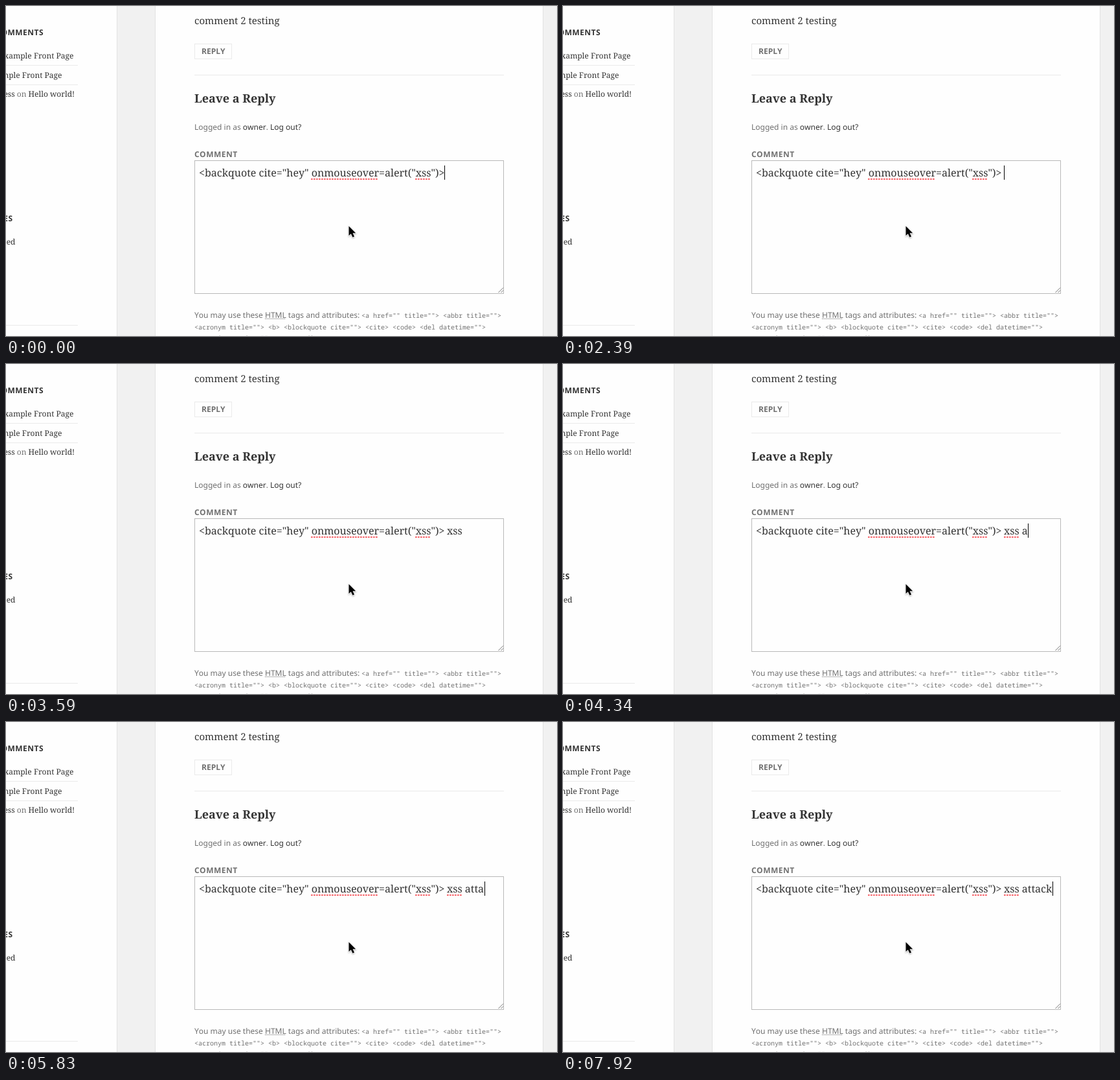
Animation of 851x509 px, one loop 8000 ms. Source, as an HTML page:

```html
<!DOCTYPE html>
<html lang="en">
<head>
<meta charset="utf-8">
<title>Comment form</title>
<style>
  html, body { margin: 0; width: 100%; height: 100%; overflow: hidden; background: #f1f1f1; }
  svg { display: block; width: 851px; height: 509px; }
  text {
    font: 12px "Noto Sans", sans-serif; fill: #707070; white-space: pre;
    font-kerning: none; font-variant-ligatures: none; text-rendering: geometricPrecision;
  }
  .serif { font-family: "Noto Serif", serif; fill: #333; }
  .body { font-size: 15px; }
  .field { font-size: 16px; }
  .title { font-size: 18px; font-weight: 700; }
  .label { font-weight: 700; }
  .wide { letter-spacing: .04em; }
  .code { font: 10px "Noto Sans Mono", monospace; }
  .end { text-anchor: end; }
  .dark { fill: #333; }
  .grey { fill: #707070; }
  .panel { fill: #fefefe; stroke: #e2e2e2; }
  .rule { stroke: #eaeaea; fill: none; }
  .spell { stroke: #f7646a; stroke-width: 2; stroke-dasharray: 2.7 1.3; }
</style>
</head>
<body>
<svg viewBox="0 0 851 509">
  <rect class="panel" x="-10.5" y="-10.5" width="182" height="530"/>
  <rect class="panel" x="230.5" y="-10.5" width="599" height="530"/>

  <!-- Sidebar -->
  <text class="label wide dark end" x="58" y="45">COMMENTS</text>
  <text class="serif end" x="104.5" y="81">xample Front Page</text>
  <text class="serif end" x="86.5" y="111">Example Front Page</text>
  <text class="serif end" x="106" y="140">ess <tspan class="grey">on</tspan> Hello world!</text>
  <text class="label wide dark end" x="10.5" y="332">CATEGORIES</text>
  <text class="serif end" x="14.5" y="368">Uncategorized</text>
  <path class="rule" d="M0 91.5H111M0 121.5H111M0 492.5H111"/>

  <!-- Comment thread -->
  <text class="serif body" x="291" y="28">comment 2 testing</text>
  <rect class="rule" x="291.5" y="58.5" width="57" height="23"/>
  <text class="label" x="302" y="74">REPLY</text>
  <path class="rule" d="M291 106.5H769"/>

  <!-- Reply form -->
  <text class="serif title" x="291" y="149">Leave a Reply</text>
  <text x="291" y="191">Logged in as <tspan class="dark">owner</tspan>. <tspan class="dark">Log out?</tspan></text>
  <text class="label wide" x="291" y="233">COMMENT</text>
  <rect x="291.5" y="238.5" width="477" height="205" fill="#fefefe" stroke="#b9b9b9"/>
  <path d="M760.5 442L768 434.5M764.5 442L768 438.5" stroke="#777"/>

  <text class="serif field" x="298" y="263">&lt;backquote cite="hey" onmouseover=alert("xss")&gt;</text>
  <text class="serif field" id="typed" x="681" y="263"></text>
  <path class="spell" d="M471 267H575"/>
  <path class="spell" d="M632 267H656"/>
  <path class="spell" id="typo" d="M681 267H705"/>
  <rect id="caret" y="246" width="1" height="22" fill="#000"/>

  <text x="291" y="481">You may use these HTML tags and attributes:</text>
  <path d="M400 482.5H432" stroke="#707070" stroke-dasharray="1 1"/>
  <text class="code" x="549" y="481">&lt;a href="" title=""&gt; &lt;abbr title=""&gt;</text>
  <text class="code" x="291" y="499">&lt;acronym title=""&gt; &lt;b&gt; &lt;blockquote cite=""&gt; &lt;cite&gt; &lt;code&gt; &lt;del datetime=""&gt;</text>
  <text class="code" x="291" y="516">&lt;em&gt; &lt;i&gt; &lt;q cite=""&gt; &lt;s&gt; &lt;strike&gt; &lt;strong&gt;</text>

  <!-- Pointer -->
  <path d="M529.5 339.5V354.3L532.8 351.2L535.4 356.8L538 355.6L535.5 350.2H540.2Z"
        fill="#000" stroke="#fff" stroke-width="1.4" paint-order="stroke"
        style="filter:drop-shadow(0 1px 1px rgba(0,0,0,.3))"/>
</svg>
<script>
  const LOOP = 8000;
  const PHRASE = "xss attack";
  // [start ms, letters typed, caret x (0 = hidden)]
  const STEPS = [
    [0, 0, 677], [450, 0, 681], [900, 0, 0], [1500, 0, 681], [1950, 0, 0], [2390, 0, 681],
    [2690, 1, 691], [2990, 2, 698], [3140, 3, 705], [3590, 3, 0],
    [3890, 4, 709], [4340, 5, 718], [4640, 6, 724], [4940, 7, 730], [5380, 7, 0],
    [5830, 8, 739], [6280, 9, 746], [6870, 9, 0],
    [7020, 10, 756], [7470, 10, 0], [7920, 10, 756]
  ];
  const [typed, typo, caret] = ["typed", "typo", "caret"].map(id => document.getElementById(id));
  const show = (el, on) => el.setAttribute("visibility", on ? "visible" : "hidden");
  let current;

  function draw(now) {
    const t = now % LOOP;
    const step = STEPS.findLast(s => s[0] <= t);
    if (step === current) return;
    current = step;
    const [, count, x] = step;
    typed.textContent = PHRASE.slice(0, count);
    show(typo, count > 3);
    show(caret, x);
    caret.setAttribute("x", x);
  }

  const start = performance.now();
  function tick() {
    draw(performance.now() - start);
    requestAnimationFrame(tick);
  }
  tick();
</script>
</body>
</html>
```
